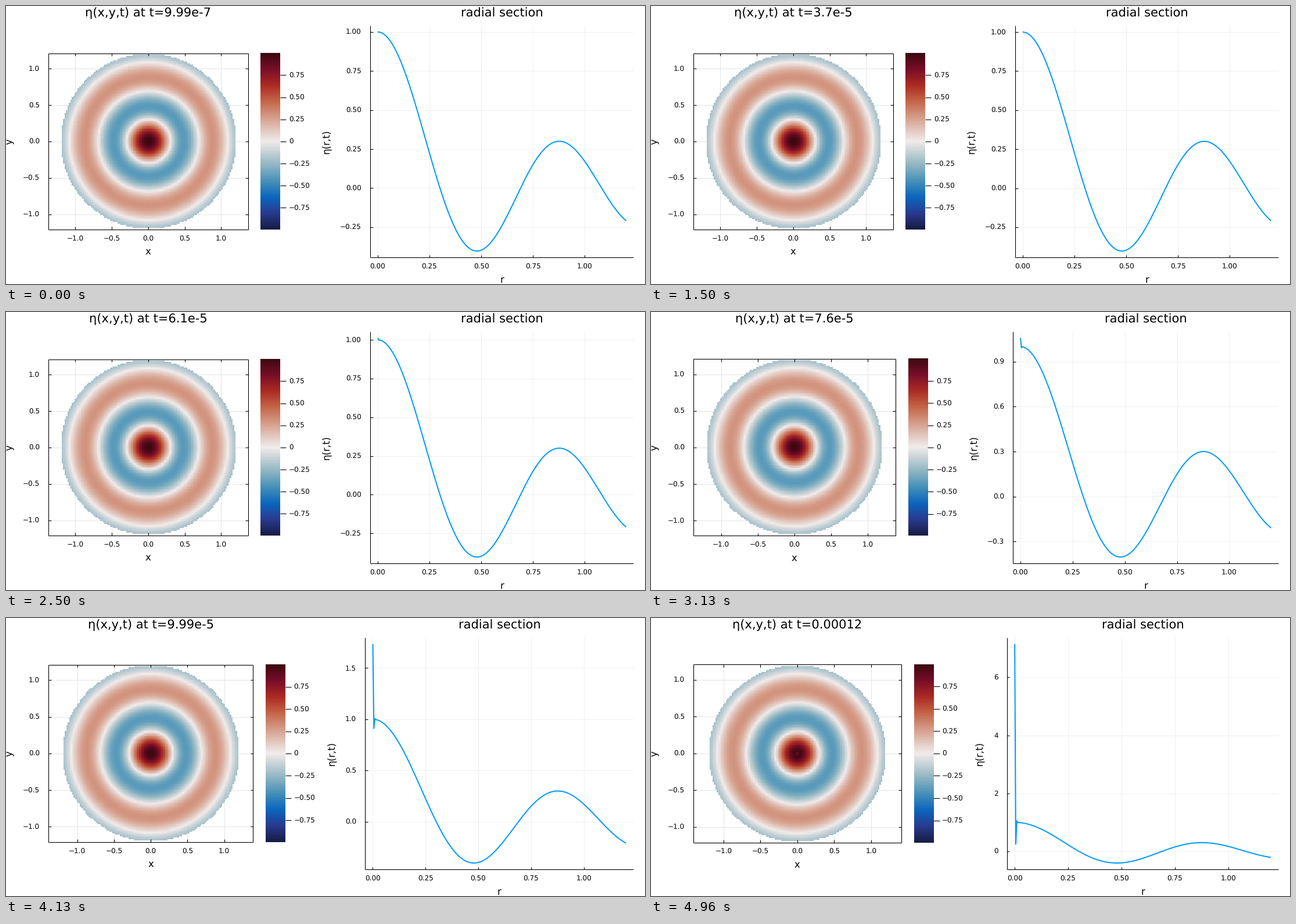
A matplotlib script for the animation above (5000 ms loop, 1100 by 480 pixels).

```python
import numpy as np
import matplotlib.pyplot as plt
from matplotlib.animation import FuncAnimation
from matplotlib.colors import LinearSegmentedColormap

W, H, DPI = 1100, 480, 100
FRAMES, LOOP_MS = 120, 5000
TICK, GUIDE, TITLE = 12, 16.5, 21
TOP, BOTTOM, RIGHT = 33.5, 434.4, 1080.3
MID_Y, LEFT = 233.9, 73
LINE_COLOR = "#009afa"

plt.rcParams.update({"font.family": "DejaVu Sans", "text.hinting": "none"})
PX = 72 / DPI

fig = plt.figure(figsize=(W / DPI, H / DPI), dpi=DPI, facecolor="white")
ax = fig.add_axes([0, 0, 1, 1])

STOPS = ["#171c42", "#293a8f", "#0b66bd", "#4590b9", "#8eb5c2", "#d2d8db",
         "#e6d2cc", "#d59d89", "#c46548", "#ac2b24", "#780e28", "#3c0911"]
balance = LinearSegmentedColormap.from_list(
    "balance",
    sorted([(i / 11, c) for i, c in enumerate(STOPS)] + [(0.5, "#f1eceb")]))


def bessel_j0(x):
    theta = (np.arange(64) + 0.5) * np.pi / 64
    return np.cos(np.multiply.outer(x, np.sin(theta))).mean(axis=-1)


# radial profile and its polar map on a square grid
radius = np.linspace(0, 1.2, 241)
profile = bessel_j0(8 * radius)
CELLS = 120
grid = np.linspace(-1.2, 1.2, CELLS)
HALF = 1.2 + 1.2 / (CELLS - 1)
dist = np.hypot(*np.meshgrid(grid, grid))
surface = np.where(dist <= 1.2, bessel_j0(8 * dist), np.nan)
CLIM = np.nanmax(surface)


def instability(step):
    return 6.15 * np.exp(0.1063 * (step - 120))


def ticks_for(low, high):
    """Pick the nicest tick step: granularity, coverage and roundness."""
    best, span = (-1, None, 0), high - low
    for scale in (0.1, 1):
        for q, nice in ((1, 1), (5, .9), (2, .7), (2.5, .5), (3, .2)):
            step = q * scale
            marks = np.arange(np.ceil(low / step), np.floor(high / step) + 1) * step
            count = len(marks)
            if not 4 <= count <= 8:
                continue
            score = ((1 - abs(count - 5) / 5) / 4
                     + 0.5 * span / ((count - 1) * step) + nice / 4)
            decimals = 0 if step >= 1 and step != 2.5 else 2 if q == 2.5 else 1
            if score > best[0]:
                best = score, marks, decimals
    return best[1:]


def label(value, decimals):
    return f"{value + 0.0:.{decimals}f}".replace("-", "−")


def time_label(step):
    value = float(f"{step * 0.99947e-6:.3g}")
    if value >= 1e-4:
        return f"{value:.6f}".rstrip("0")
    mantissa, exponent = f"{value:.2e}".split("e")
    mantissa = mantissa.rstrip("0")
    if mantissa.endswith("."):
        mantissa += "0"
    return f"{mantissa}e{int(exponent)}"


def text(x, y, s, size=TICK, ha="center", rotation=0):
    ax.text(x, y, s, fontsize=size * PX, ha=ha, va="baseline",
            rotation=rotation, rotation_mode="anchor", color="black")


def line(x0, y0, x1, y1, color="black", width=1.1, z=4):
    ax.plot([x0, x1], [y0, y1], color=color, lw=width * PX, zorder=z,
            solid_capstyle="butt")


def draw_axes(box, xticks, yticks, xdec, ydec, to_x, to_y, boxed, grid_color):
    left, top, right, bottom = box
    for value in xticks:
        x = to_x(value)
        line(x, top, x, bottom, grid_color, 0.9, 1)
        line(x, bottom, x, bottom - 4.5)
        if boxed:
            line(x, top, x, top + 4.5)
        text(x, bottom + 19.7, label(value, xdec))
    for value in yticks:
        y = to_y(value)
        line(left, y, right, y, grid_color, 0.9, 1)
        line(left, y, left + 4.5, y)
        if boxed:
            line(right, y, right - 4.5, y)
        text(left - 15.2, y + 4.4, label(value, ydec), ha="right")
    line(left, top, left, bottom)
    line(left, bottom, right, bottom)
    if boxed:
        line(left, top, right, top)
        line(right, top, right, bottom)


def draw_map(step, right):
    scale = 125.7 + 0.092 * (right - 416.8)
    mid_x, half = (LEFT + right) / 2, HALF * scale
    top, bottom = MID_Y - half, MID_Y + half
    values = surface.copy()
    core = slice(CELLS // 2 - 1, CELLS // 2 + 1)
    values[core, core] -= 0.1 * instability(step) / instability(120)
    style = dict(cmap=balance, vmin=-CLIM, vmax=CLIM, aspect="auto",
                 interpolation="nearest", zorder=2)
    ax.imshow(values, extent=(mid_x - half, mid_x + half, bottom, top), **style)

    marks = np.arange(-2, 3) / 2
    draw_axes((LEFT, top, right, bottom), marks, marks, 1, 1,
              lambda v: mid_x + v * scale, lambda v: MID_Y - v * scale,
              True, "#e2e2e2")
    text(mid_x, 18.4, f"η(x,y,t) at t={time_label(step)}", TITLE)
    text(mid_x, bottom + 43.2, "x", GUIDE)
    text(10, MID_Y, "y", GUIDE, rotation=90)

    bar = right + 21.8, right + 55.2
    ax.imshow(np.linspace(CLIM, -CLIM, 256)[:, None],
              extent=(*bar, bottom, top), **style)
    for value in np.arange(-3, 4) / 4:
        y = MID_Y - value / CLIM * half
        line(bar[1], y, bar[1] + 10.5, y)
        text(bar[1] + 15.2, y + 4.4, label(value, 2 if value else 0), ha="left")


def draw_section(values, low, high, marks, decimals, left):
    x_scale = (RIGHT - left) / (1.2 * 1.06)

    def to_x(r):
        return left + (r + 0.036) * x_scale

    def to_y(v):
        return BOTTOM - (v - low) / (high - low) * (BOTTOM - TOP)

    draw_axes((left, TOP, RIGHT, BOTTOM), np.arange(5) / 4, marks, 2, decimals,
              to_x, to_y, False, "#efefef")
    ax.plot(to_x(radius), to_y(values), color=LINE_COLOR, lw=2 * PX, zorder=5,
            solid_joinstyle="round", solid_capstyle="butt")
    mid_x = (left + RIGHT) / 2
    text(mid_x, 18.4, "radial section", TITLE)
    text(mid_x, BOTTOM + 43.2, "r", GUIDE)
    text(1183.9 - left, MID_Y, "η(r,t)", GUIDE, rotation=90)


def draw(frame):
    step = frame + 1
    ax.clear()
    ax.axis("off")

    values = profile.copy()
    values[:3] += instability(step) * np.array([1, -0.122, 0.0085])
    pad = 0.03 * np.ptp(values)
    low, high = values.min() - pad, values.max() + pad
    marks, decimals = ticks_for(low, high)

    # wider tick labels push the two panels together
    if decimals == 2:
        left = 627.1
    elif decimals == 1:
        left = 623 if marks[0] < -0.01 else 618.4
    else:
        left = 612.9
    draw_map(step, 1043.7 - left)
    draw_section(values, low, high, marks, decimals, left)
    ax.set_xlim(0, W)
    ax.set_ylim(H, 0)
    return []


anim = FuncAnimation(fig, draw, frames=FRAMES, interval=LOOP_MS / FRAMES,
                     init_func=lambda: [], repeat=True, repeat_delay=0)
plt.show()
```
